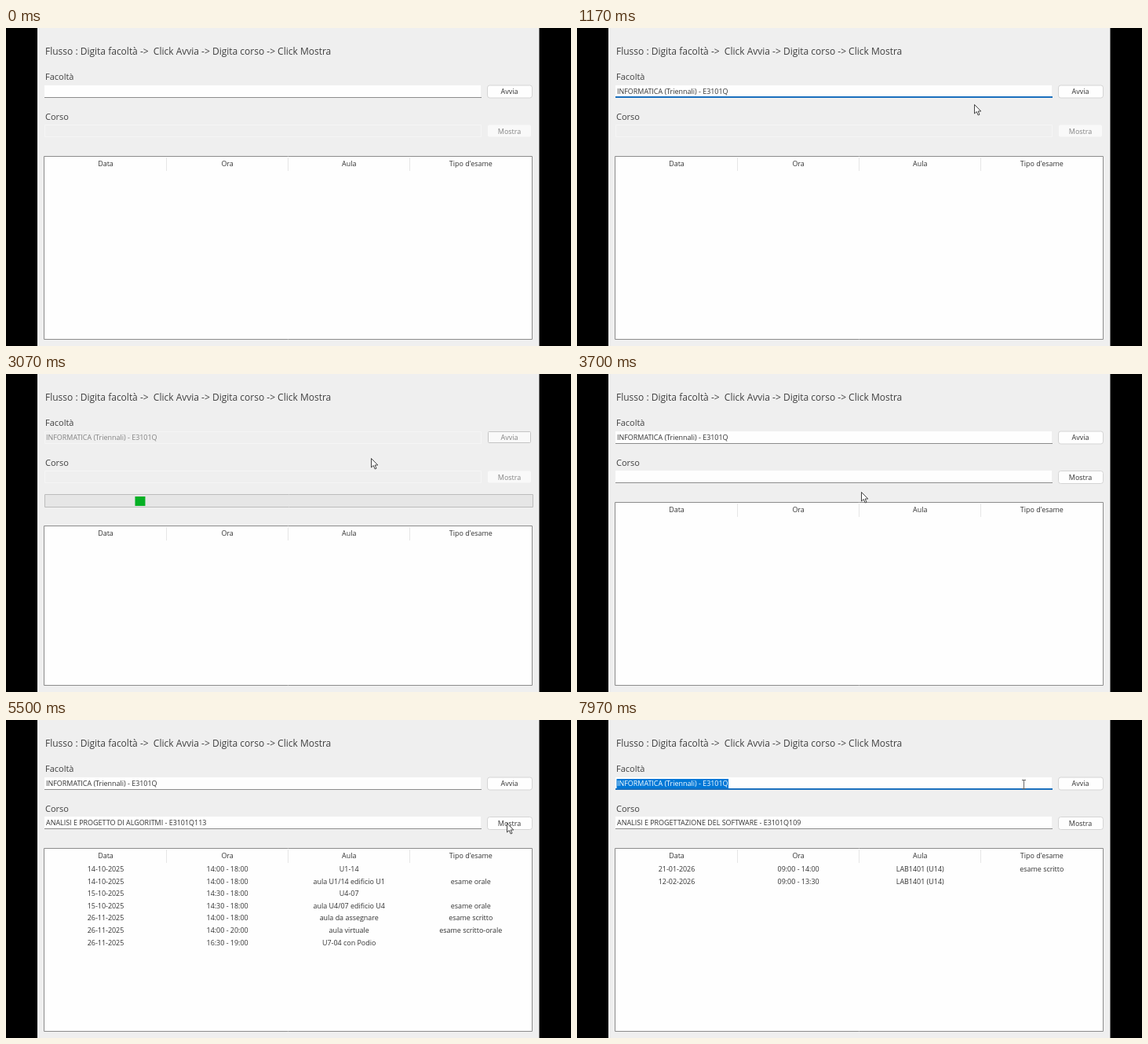
Write an HTML page with a canvas that moves like this. It is 720 by 405 pixels and loops after 8 s.

```html
<!DOCTYPE html>
<html lang="it">
<head>
<meta charset="utf-8">
<style>
  html, body { margin: 0; width: 100%; height: 100%; overflow: hidden; background: #000; }
  canvas { display: block; }
</style>
</head>
<body>
<canvas id="stage" width="720" height="405"></canvas>
<script>
const ctx = document.getElementById('stage').getContext('2d');
const LOOP = 8000;
const COLOR = {
  page: '#efefef', paper: '#fefefe', ink: '#333333', label: '#404040', muted: '#838383',
  faint: '#f9f9f9', line: '#8c8c8c', divider: '#e6e6e6', focus: '#1a6fbd', green: '#06b025'
};
const FONT = '"Open Sans", "Noto Sans", sans-serif';
const TEXT_SIZE = 8.95;

const FACULTY = 'INFORMATICA (Triennali) - E3101Q';
const COURSES = [
  'MATEMATICA II - E3101Q142M',
  'ANALISI E PROGETTO DI ALGORITMI - E3101Q113',
  'INFORMATICA GRAFICA - E3101Q134',
  'RETI E SISTEMI OPERATIVI - E3101Q110',
  "LINGUAGGI E COMPUTABILITA' - E3101Q111",
  'ELABORAZIONE DEI SEGNALI PER SISTEMI INTELLIGENTI - E3101Q143'
];
const DESIGN = 'ANALISI E PROGETTAZIONE DEL SOFTWARE - E3101Q109';
const HEADERS = ['Data', 'Ora', 'Aula', "Tipo d'esame"];
const FIRST_EXAMS = [
  ['14-10-2025', '14:00 - 18:00', 'U1-14', ''],
  ['14-10-2025', '14:00 - 18:00', 'aula U1/14 edificio U1', 'esame orale'],
  ['15-10-2025', '14:30 - 18:00', 'U4-07', ''],
  ['15-10-2025', '14:30 - 18:00', 'aula U4/07 edificio U4', 'esame orale'],
  ['26-11-2025', '14:00 - 18:00', 'aula da assegnare', 'esame scritto'],
  ['26-11-2025', '14:00 - 20:00', 'aula virtuale', 'esame scritto-orale'],
  ['26-11-2025', '16:30 - 19:00', 'U7-04 con Podio', '']
];
const SECOND_EXAMS = [
  ['21-01-2026', '09:00 - 14:00', 'LAB1401 (U14)', 'esame scritto'],
  ['12-02-2026', '09:00 - 13:30', 'LAB1401 (U14)', '']
];

// Moments of the interaction, in ms
const AT = {
  facultyClick: 340, facultyTyping: 500, facultyPick: 1110, start: 1600, load: 1712, loaded: 3520,
  courseClick: 4060, courseTyping: 4200, coursePick: 4950, show: 5400,
  courseAgain: 5800, typingAgain: 5860, pickAgain: 6800, showAgain: 7150, selectFaculty: 7850
};

// Pointer path: time, x, y
const PATH = [
  [40, 540, 2], [320, 480, 81], [400, 480, 81], [720, 500, 350], [860, 500, 347],
  [1090, 506, 97], [1180, 506, 97], [1500, 640, 80], [1720, 640, 82], [2330, 540, 130],
  [2650, 515, 189], [3070, 465, 107], [3420, 420, 201], [3850, 340, 131], [4100, 340, 131],
  [4600, 308, 141], [4900, 190, 157], [4980, 190, 157], [5300, 640, 131], [5480, 640, 131],
  [5780, 501, 131], [6500, 501, 131], [6740, 300, 157], [6830, 300, 157], [7080, 640, 131],
  [7200, 640, 131], [7400, 600, 254], [7780, 569, 82], [8000, 569, 82]
];

const arrow = new Path2D('M.5 .5V12L3.2 9.5 5.2 14 7 13.2 5.1 9H8.8Z');
const between = (t, a, b) => t >= a && t < b;
const typed = (word, t, start, step) => word.slice(0, Math.max(0, Math.floor((t - start) / step) + 1));

function rect(x, y, w, h, fill, stroke, radius = 0) {
  ctx.beginPath();
  ctx.roundRect(x + .5, y + .5, w - 1, h - 1, radius);
  if (fill) { ctx.fillStyle = fill; ctx.fill(); }
  if (stroke) { ctx.strokeStyle = stroke; ctx.lineWidth = 1; ctx.stroke(); }
}

function bar(x, y, w, h, color) {
  ctx.fillStyle = color;
  ctx.fillRect(x, y, w, h);
}

function text(str, x, middle, { size = TEXT_SIZE, color = COLOR.ink, align = 'left' } = {}) {
  ctx.font = `${size}px ${FONT}`;
  ctx.textAlign = align;
  ctx.fillStyle = color;
  ctx.fillText(str, x, middle + size * .36);
}

function button(str, middle, enabled, outlined) {
  if (enabled) rect(613, middle - 8.5, 58, 17, COLOR.paper, '#d4d4d4', 3);
  else rect(614, middle - 8, 55, 15, COLOR.faint, outlined ? '#c4c4c4' : COLOR.faint, 1);
  text(str, 641.5, middle, { align: 'center', color: enabled ? COLOR.ink : COLOR.muted });
}

function field({ y, value, enabled, focused, selected, items }) {
  const top = items ? y - 1 : y;
  if (enabled) {
    bar(49, top, 556, 16, COLOR.paper);
    if (focused) bar(49, top + 14, 557, 2, COLOR.focus);
    else bar(49, top + 15, 557, 1, COLOR.line);
  } else {
    rect(49, top, 557, 16, null, '#f5f5f5');
  }
  if (selected) {
    ctx.font = `${TEXT_SIZE}px ${FONT}`;
    bar(50.5, top + 2, ctx.measureText(value).width + 1, 12, '#0078d7');
  }
  text(value, 51, top + 8, { color: selected ? '#fff' : enabled ? COLOR.ink : COLOR.muted });
  if (items) {
    bar(49, top + 17, 556, 76, COLOR.paper);
    bar(49, top + 17, 1, 76, '#d0d0d0');
    items.forEach((item, i) => text(item, 50, top + 23.5 + i * 12.45));
  }
}

function progress(t, y) {
  rect(49, y, 623, 17, '#e6e6e6', '#bcbcbc');
  const travel = ((t - AT.load) * .8135) % 1220;
  bar(50 + (travel < 610 ? travel : 1220 - travel), y + 3, 13, 12, COLOR.green);
}

function table(top, rows) {
  rect(48, top, 623, 397 - top, COLOR.paper, COLOR.line);
  [204, 359, 514].forEach(x => bar(x, top + 2, 1, 17, COLOR.divider));
  const cells = (row, y) => row.forEach((cell, i) =>
    text(cell, 127 + i * 155.1, y, { align: 'center' }));
  cells(HEADERS, top + 10);
  rows.forEach((row, i) => cells(row, top + 27 + i * 15.55));
}

function pointer(t) {
  if (t < PATH[0][0]) return null;
  const i = Math.max(1, PATH.findIndex(p => p[0] > t));
  const [t0, x0, y0] = PATH[i - 1], [t1, x1, y1] = PATH[i];
  const k = (t - t0) / (t1 - t0), ease = k * k * (3 - 2 * k);
  return [x0 + (x1 - x0) * ease, y0 + (y1 - y0) * ease];
}

function drawPointer([x, y], overField) {
  ctx.save();
  ctx.translate(Math.round(x), Math.round(y));
  if (overField) {
    bar(0, -6, 1, 12, '#666');
    bar(-2, -6, 5, 1, '#666');
    bar(-2, 5, 5, 1, '#666');
  } else {
    ctx.fillStyle = '#fff';
    ctx.strokeStyle = '#444';
    ctx.lineWidth = 1;
    ctx.fill(arrow);
    ctx.stroke(arrow);
  }
  ctx.restore();
}

function courseState(t) {
  if (t < AT.courseTyping) return { value: '' };
  if (t < AT.coursePick) return { value: 'a', items: COURSES };
  if (t < AT.courseAgain) return { value: COURSES[1] };
  if (t < AT.pickAgain) {
    const value = typed('analis', t, AT.typingAgain, 90);
    const items = value.length > 1 ? [COURSES[1], DESIGN] : value && COURSES;
    return { value, items };
  }
  return { value: DESIGN };
}

function draw(t) {
  bar(0, 0, 720, 405, '#000');
  bar(40, 0, 639.5, 405, COLOR.page);
  text('Flusso : Digita facoltà ->  Click Avvia -> Digita corso -> Click Mostra', 50, 29.5,
    { size: 12, color: COLOR.label });

  const loading = between(t, AT.load, AT.loaded);
  const picking = between(t, AT.facultyTyping, AT.facultyPick);
  const facultyValue = t < AT.facultyPick ? typed('inform', t, AT.facultyTyping, 80) : FACULTY;
  text('Facoltà', 50, 62, { size: 11, color: COLOR.label });
  field({
    y: 73, value: facultyValue, enabled: !loading,
    focused: between(t, AT.facultyClick, AT.start) || t >= AT.selectFaculty,
    selected: t >= AT.selectFaculty,
    items: picking && [FACULTY]
  });
  button('Avvia', picking ? 118.5 : 81, !loading, true);

  const shift = picking ? 75 : 0;
  const course = courseState(t);
  const ready = t >= AT.loaded;
  text('Corso', 50, 113 + shift, { size: 11, color: COLOR.label });
  field({
    y: 123 + shift, ...course, enabled: ready,
    focused: between(t, AT.courseClick, 5320) || between(t, AT.courseAgain, 7090)
  });
  button('Mostra', course.items ? 169 : 131.5 + shift, ready);

  if (loading) progress(t, 153);
  const rows = t < AT.show ? [] : t < AT.showAgain ? FIRST_EXAMS : SECOND_EXAMS;
  table(163 + (loading ? 30 : course.items ? 75 : shift), rows);

  const at = pointer(t);
  if (at) {
    const [x, y] = at;
    const overField = between(y, 72, 90) || between(y, 122 + shift, 139 + shift);
    drawPointer(at, x < 606 && overField);
  }
}

const begin = performance.now();
function frame() {
  draw((performance.now() - begin) % LOOP);
  requestAnimationFrame(frame);
}
frame();
</script>
</body>
</html>
```
